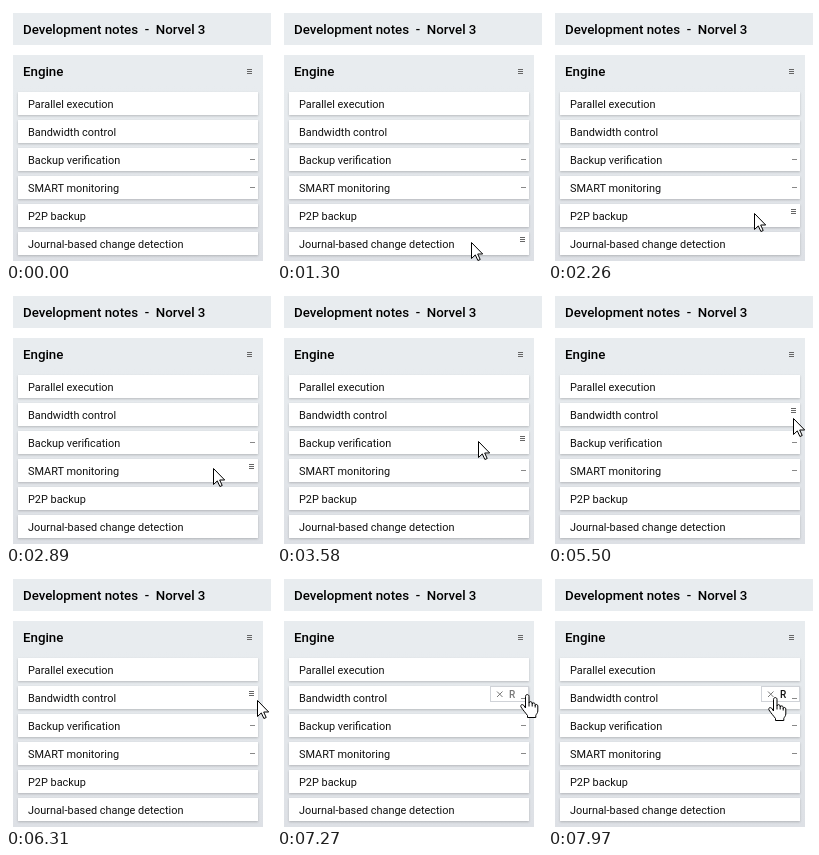
These frames come from a looping animation (265 by 255 pixels, 8 s). An HTML page:

```html
<!DOCTYPE html>
<html lang="en">
<head>
<meta charset="utf-8">
<title>Development notes</title>
<style>
  html, body { margin: 0; width: 100%; height: 100%; overflow: hidden; background: #fff; }
  svg { display: block; }
  text { font: 10.9px Roboto, Inter, sans-serif; fill: #111; white-space: pre; }
  .head { font-size: 13.3px; font-weight: 500; fill: #000; }
  .line { fill: #666; }
  .dash { fill: #888; }
  .card { fill: #fff; filter: drop-shadow(0 1px 1px #0003); }
  .cursor path { fill: #fff; stroke: #000; stroke-linejoin: round; }
  .cursor .crease { fill: none; }
  #mark { font-size: 10px; font-weight: 500; }
</style>
</head>
<body>
<svg width="265" height="255" viewBox="0 0 265 255">
  <defs>
    <linearGradient id="panel" x1="0" y1="0" x2="0" y2="1">
      <stop offset=".15" stop-color="#e8ecef"/>
      <stop offset="1" stop-color="#dde0e5"/>
    </linearGradient>
    <path id="menu" class="line" d="M0 0h5v1H0zm0 2h5v1H0zm0 2h5v1H0z"/>
  </defs>
  <rect x="7" y="7" width="258" height="32" fill="#e8ecef"/>
  <text class="head" x="17" y="28">Development notes  -  Norvel 3</text>
  <rect x="7" y="49" width="250" height="206" fill="url(#panel)"/>
  <text class="head" x="17" y="70">Engine</text>
  <use href="#menu" x="241" y="63"/>
  <g id="rows"></g>
  <g id="popup">
    <rect x="213.5" y="114.5" width="38" height="15" fill="#fff" stroke="#d0d3d8"/>
    <path d="M220 119.500l5.500 5.500m0-5.500l-5.500 5.500" stroke="#777"/>
    <text id="mark" x="232" y="126">R</text>
    <rect class="dash" x="244" y="126" width="5" height="1"/>
  </g>
  <g id="arrow" class="cursor">
    <path d="M.5.5v16l3.800-3.600 2.600 5.600 2.300-1-2.500-5.500h5z"/>
  </g>
  <g id="hand" class="cursor">
    <path d="M5.5 14V2.5c0-2.6 3.5-2.6 3.5 0V9c0-1.8 3-1.8 3.2 0v1c.2-1.6 2.9-1.4 3 .4v1c.3-1.4 2.6-1.2 2.6.6v5c0 2-1.5 3-2 4.5v2H7.5v-2C6 19.5 3 16 1 13c-1-2 1.2-3.2 2.6-1.8z"/>
    <path class="crease" d="M9 9v3.5M12.2 9.5v3M15.2 11v2.5"/>
  </g>
</svg>
<script>
const LOOP = 8000, POPUP_AT = 6350, TOP = 86, PITCH = 28;
const $ = id => document.getElementById(id);

const labels = ['Parallel execution', 'Bandwidth control', 'Backup verification',
  'SMART monitoring', 'P2P backup', 'Journal-based change detection'];
const dashed = ['Backup verification', 'SMART monitoring'];

$('rows').innerHTML = labels.map((label, i) => `
  <g transform="translate(0 ${TOP + i * PITCH})">
    <rect class="card" x="12" width="240" height="23"/>
    <text x="22" y="16">${label}</text>
    ${dashed.includes(label) ? '<rect class="dash" x="244" y="11" width="5" height="1"/>' : ''}
    <use class="menu" href="#menu" x="243" y="5"/>
  </g>`).join('');
const rows = [...$('rows').children];

// Pointer moves: start, end, then the tip position reached
const moves = [
  [910, 1460, 200, 230],
  [1620, 2410, 207, 205],
  [2440, 2680, 207, 179],
  [2890, 3220, 201, 152],
  [3580, 4070, 219, 129],
  [4350, 4680, 243, 129],
  [5070, 5400, 245, 129],
  [5500, 5720, 251, 129],
  [6250, 6580, 250, 122],
  [7270, 7600, 239, 123],
  [7820, 7970, 227, 125]
];

function ease(t, start, end) {
  const u = Math.min(1, Math.max(0, (t - start) / (end - start)));
  return u * u * (3 - 2 * u);
}

function pointer(t) {
  return moves.reduce(([x, y], [start, end, toX, toY]) => {
    const e = ease(t, start, end);
    return [x + (toX - x) * e, y + (toY - y) * e];
  }, [172, 260]).map(Math.round);
}

const show = (el, on) => { if (el) el.style.display = on ? '' : 'none'; };

function draw(now) {
  const t = now % LOOP, [x, y] = pointer(t), open = t >= POPUP_AT;
  const hovered = open ? -1 : Math.floor((y - TOP) / PITCH);
  rows.forEach((row, i) => {
    show(row.querySelector('.menu'), i === hovered);
    show(row.querySelector('.dash'), i !== hovered);
  });
  show($('popup'), open);
  show($('arrow'), !open);
  show($('hand'), open);
  $('mark').style.fill = x < 243 ? '#111' : '#777';
  $('arrow').setAttribute('transform', `translate(${x} ${y})`);
  $('hand').setAttribute('transform', `translate(${x - 7} ${y})`);
  requestAnimationFrame(draw);
}
requestAnimationFrame(draw);
</script>
</body>
</html>
```
